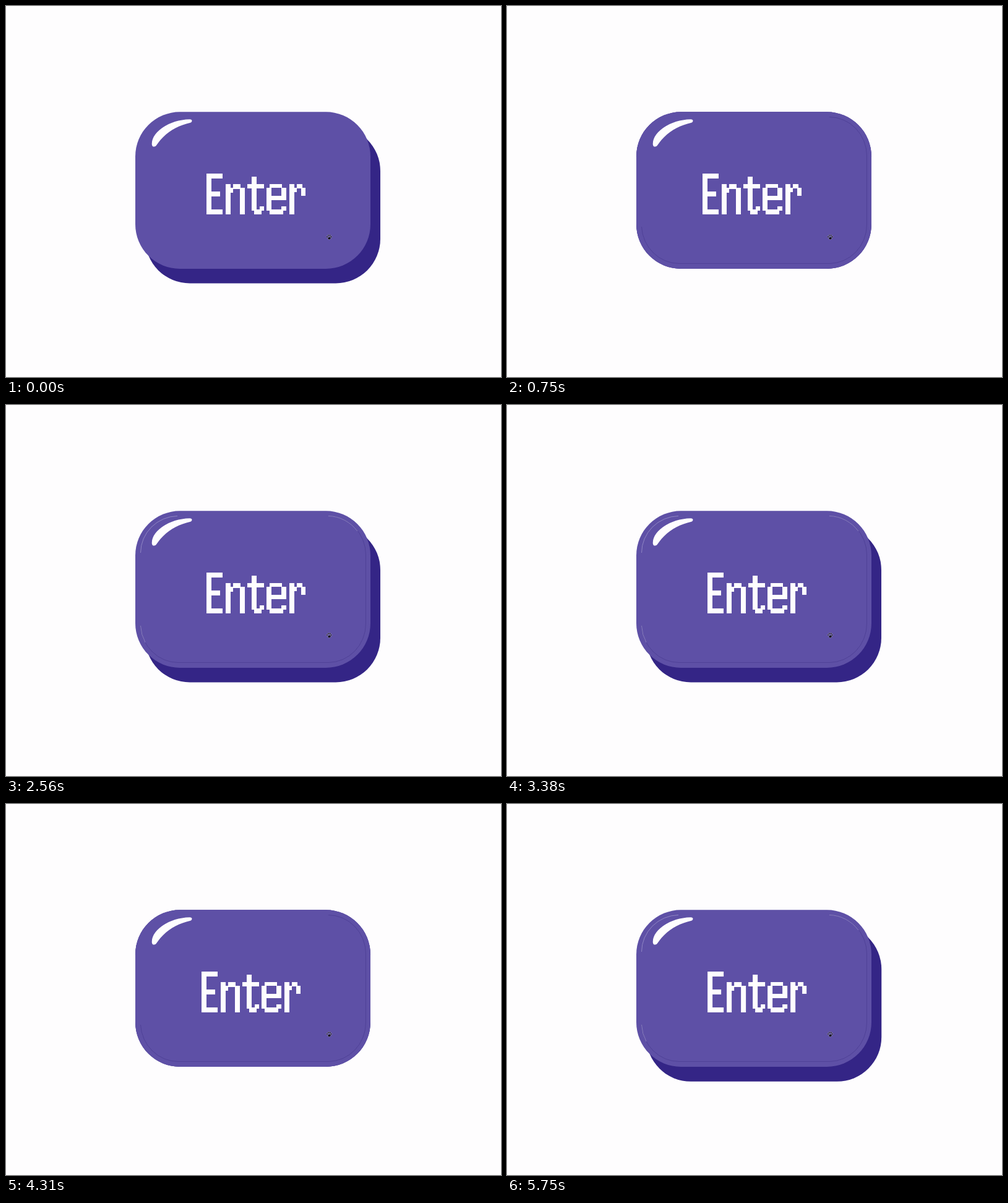
Write an HTML page that moves like this. It is 800 by 600 pixels and loops after 5.81 s.

```html
<!DOCTYPE html>
<html lang="en">
<head>
<meta charset="utf-8">
<title>Enter key</title>
<style>
  html, body { margin: 0; width: 100%; height: 100%; overflow: hidden; background: #fefdfe; }
  svg { display: block; width: 800px; height: 600px; }
</style>
</head>
<body>
<svg viewBox="0 0 800 600" role="img" aria-label="Enter">
  <rect id="base" x="209" y="171.3" width="380" height="253.6" rx="72" fill="#342586"/>
  <rect x="209" y="171.3" width="380" height="253.6" rx="72" fill="#5e50a6"/>

  <!-- hairline seam inside the key cap -->
  <g id="seam" fill="none" stroke-width=".7">
    <path stroke="#34277c" stroke-opacity=".5"
      d="M521 179.5A61 63 0 0 1 581.5 242V354A61 63 0 0 1 521 416.5H278A61 63 0 0 1 217.5 357"/>
    <path id="glint" stroke="#c3bce0" stroke-opacity=".7"
      d="M217.5 239A61 60 0 0 1 277 179.5M521 179.5A61 63 0 0 1 568 204M217.5 357A61 63 0 0 0 225 384"/>
  </g>

  <path fill="#fefdfe" d="M235.8 222C236 205 262 184 297 183.2C301.500 183.200 301.500 187.500 298 188.700C275 194 257 205 244 224C241 229.500 235 228.500 235.800 222Z"/>

  <!-- pixel lettering -->
  <g id="label" fill="#fefdfe" fill-rule="evenodd">
    <path d="M324 271h26v8h-18v21h14v8h-14v21h18v8h-26z"/>
    <path d="M355 288h8v6h4v-6h12v6h7v43h-8v-41h-11v6h-4v35h-8z"/>
    <path d="M397 276h8v12h12v7h-12v34h5v-5h7v7h-4v6h-12v-6h-4v-36h-7v-7h7z"/>
    <path d="M426 288h20v6h7v20h-24v15h16v-5h8v7h-5v6h-22v-6h-5v-37h5zM429 294h16v13h-16z"/>
    <path d="M458 288h8v6h4v-6h9v6h5v13h-7v-12h-7v6h-4v36h-8z"/>
  </g>

  <g id="paw" fill="#08060f" stroke="#b9b1da" stroke-width=".5">
    <circle cx="-3" cy="-.7" r="1.2"/>
    <circle cx="-1" cy="-3" r="1.2"/>
    <circle cx="1.700" cy="-3" r="1.200"/>
    <circle cx="3.500" cy="-.700" r="1.200"/>
    <path d="M-2 1.500Q.500 -2 3.200 1Q3 3.700 .500 3.700Q-2 4.200 -2 1.500Z"/>
  </g>
</svg>
<script>
const LOOP = 5810, STEP = 62.5, EASE_MS = 400;
// key travel: [start time, raised amount to reach]
const MOVES = [[330, 0], [1856, 1], [3758, 0], [5392, 1]];
const el = id => document.getElementById(id);

function outBack(p) {
  const u = Math.min(Math.max(p, 0), 1) - 1;
  return 1 + 2.70158 * u ** 3 + 1.70158 * u * u;
}

function raised(t) {
  let v = 1;
  for (const [start, goal] of MOVES)
    if (t >= start) v = 1 - goal + (2 * goal - 1) * outBack((t - start) / EASE_MS);
  return v;
}

function draw(t) {
  const k = raised(t);
  const seam = t >= 60 && (t < 5180 || t >= 5392);
  el('base').setAttribute('transform', `translate(${16 * k} ${23.6 * k})`);
  el('label').setAttribute('transform', `translate(${8 * (k - 1)} 0)`);
  el('paw').setAttribute('transform', `translate(522 ${t < 1900 ? 374 : 372.7})`);
  el('seam').setAttribute('opacity', seam ? 1 : 0);
  el('glint').setAttribute('opacity', Math.min(Math.max(k, 0), 1));
}

const begin = performance.now();
function tick() {
  const t = (performance.now() - begin) % LOOP;
  draw(Math.floor((t + 3) / STEP) * STEP);
  requestAnimationFrame(tick);
}
tick();
</script>
</body>
</html>
```
